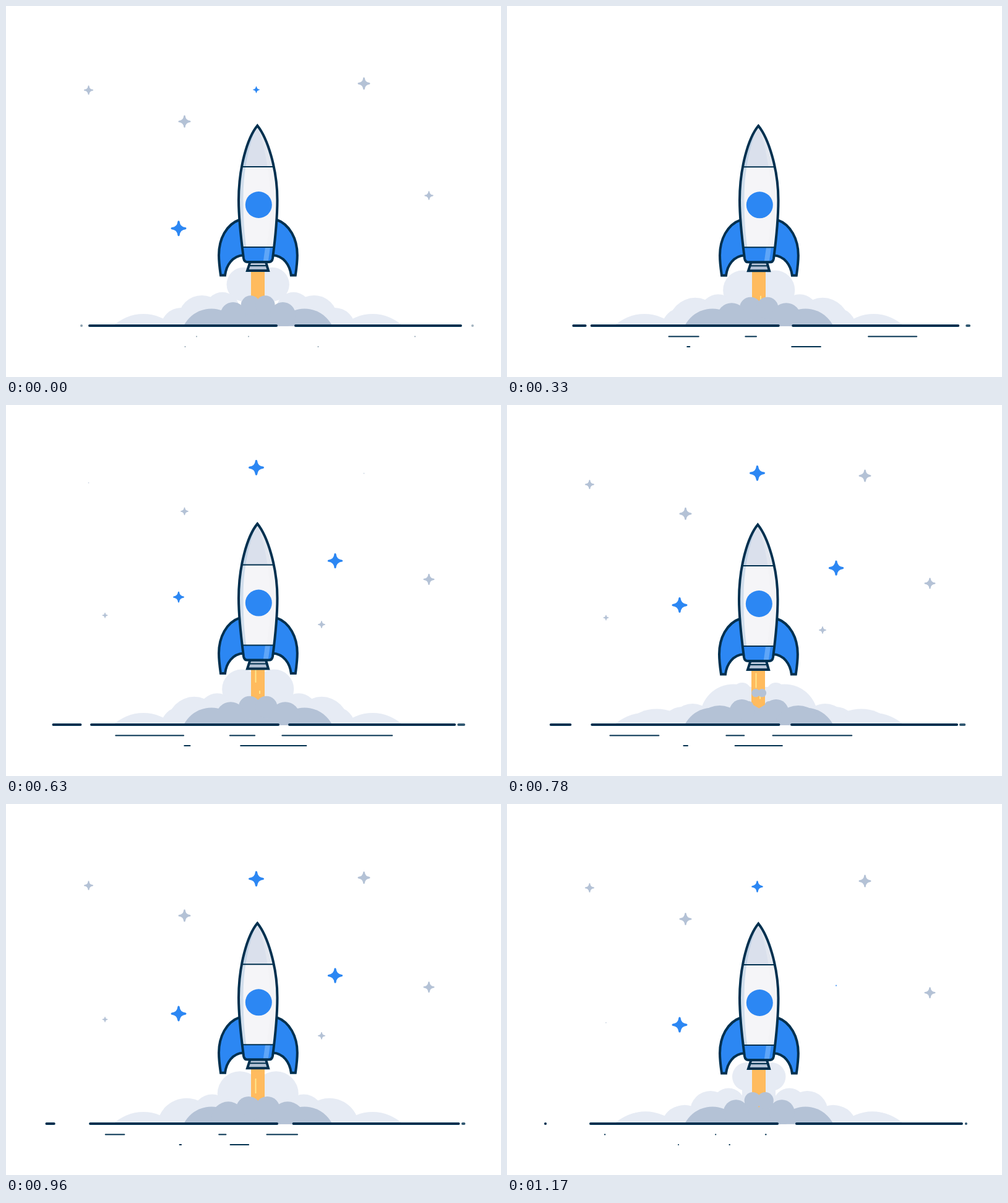
These frames come from a looping animation (800x600 px, 1200 ms). An HTML page:

```html
<!DOCTYPE html>
<html lang="en">
<head>
<meta charset="utf-8">
<title>Rocket launch</title>
<style>
html, body { margin: 0; width: 100%; height: 100%; overflow: hidden; background: #fff; }
svg { display: block; width: 100%; height: 100%; }
.o { stroke: #00304f; stroke-width: 4; stroke-linecap: round; }
.thin { stroke-width: 2; }
</style>
</head>
<body>
<svg viewBox="0 0 800 600">
  <defs>
    <clipPath id="sky"><rect width="800" height="517.5"/></clipPath>
    <path id="hull" d="M406.3 193.5C390 213 376 262 376 314C376 348 381 385 384 408Q385 414 390 414H425Q430 414 431 408C434 385 438.5 348 438.5 314C438.5 262 422 213 406.3 193.5Z"/>
    <clipPath id="inside"><use href="#hull"/></clipPath>
    <path id="fin" class="o" fill="#2c87f3" d="M378 345.5C356 353 344 377 344 403C344 415 345.5 425 347 435.5H354C356 419 366 404 384 403Z"/>
    <path id="star" d="M0-10.8Q1-1 10.8 0Q1 1 0 10.8Q-1 1-10.8 0Q-1-1 0-10.8Z" stroke-width="3.2" stroke-linejoin="round"/>
  </defs>
  <g id="stars"></g>
  <g id="light" clip-path="url(#sky)" fill="#e6ebf4">
    <path d="M380 456H434V503H531V518H283V503H380Z"/>
  </g>
  <g id="flame"><rect x="396" y="424" width="22" height="72" fill="#ffbb5e"/></g>
  <g id="dark" clip-path="url(#sky)" fill="#b4c2d6">
    <path d="M340 518V494H388L397 484.5L407.3 490.5L417.5 484.5L426 494H474V518Z"/>
  </g>
  <g id="rocket">
    <use href="#fin"/>
    <use href="#fin" transform="translate(814.8) scale(-1 1)"/>
    <path class="o" fill="#b4c2d6" d="M394.5 414H420L424 428H390Z"/>
    <path class="o thin" d="M393 420H421.5"/>
    <g clip-path="url(#inside)">
      <rect x="370" y="190" width="74" height="70" fill="#dae0ec"/>
      <rect x="370" y="260" width="74" height="130" fill="#f5f5f8"/>
      <path fill="#96b9d7" fill-opacity=".38" d="M406 193C394 220 383.5 262 383.5 310C383.5 345 386 375 388.5 390H370V193Z"/>
      <path fill="#f0f0f3" fill-opacity=".4" d="M406 193C418 225 427 270 427 320C427 350 424 372 421 390H444V193Z"/>
      <rect x="370" y="390" width="74" height="26" fill="#2c87f3"/>
      <path fill="#5fa6f8" d="M419 390H427L423.5 415H415.5Z"/>
      <path class="o thin" d="M370 260H444M370 390H444"/>
    </g>
    <use href="#hull" class="o" fill="none"/>
    <circle cx="408.3" cy="321.5" r="21.5" fill="#2c87f3"/>
  </g>
  <g id="ground"></g>
</svg>
<script>
const LOOP = 1200, PUFF = 300, MID = 407.2;
const GREY = '#b4c2d6', BLUE = '#2c87f3';

const $ = id => document.getElementById(id);
function set(el, attrs) {
  for (const k in attrs) el.setAttribute(k, attrs[k]);
}
function add(parent, tag, attrs = {}) {
  const el = document.createElementNS('http://www.w3.org/2000/svg', tag);
  set(el, attrs);
  parent.appendChild(el);
  return el;
}
const clamp = v => Math.max(0, Math.min(1, v));

// Straight moves between key points [time, ...values]; null outside them
function along(path, t) {
  const i = path.findIndex((p, j) => j && t >= path[j - 1][0] && t < p[0]);
  if (i < 0) return null;
  const a = path[i - 1], b = path[i], k = (t - a[0]) / (b[0] - a[0]);
  return a.slice(1).map((v, j) => v + (b[j + 1] - v) * k);
}

// Stars pop in, sink for LIFE ms and shrink away
const LIFE = 800, POP = 94;
const star = (x, y, speed, r, color, birth) => ({
  x, y, speed, r, birth,
  el: add($('stars'), 'use', { href: '#star', fill: color, stroke: color })
});
const stars = [
  star(133.5, 125.6, .018, 7.5, GREY, 618),
  star(578.5, 110.3, .026, 10, GREY, 620),
  star(288.5, 170.4, .026, 10, GREY, 570),
  star(683.5, 275.3, .043, 9, GREY, 475),
  star(279, 304.9, .086, 12.5, BLUE, 563),
  star(404.5, 89.8, .06, 12.5, BLUE, 440),
  star(532, 232.8, .077, 12.2, BLUE, 380),
  star(510, 339.1, .06, 6, GREY, 365),
  star(160, 334.2, .025, 4.5, GREY, 390)
];

function drawStars(t) {
  for (const { x, y, speed, r, birth, el } of stars) {
    const age = (t - birth + LOOP) % LOOP;
    const size = clamp(age / POP) * clamp((LIFE - age) / POP) * r / 12.4;
    set(el, { transform: `translate(${x} ${y + age * speed}) scale(${size})` });
  }
}

// Each puff is mirrored about MID: x, top, radius
const pair = group => [0, 1].map(() => add($(group), 'circle'));
function place(els, [x, top, r]) {
  els.forEach((el, i) => set(el, { cx: i ? 2 * MID - x : x, cy: top + r, r }));
}
place(pair('light'), [222, 498, 71]);
place(pair('light'), [283, 488, 33]);
place(pair('dark'), [332, 489.5, 50]);
place(pair('dark'), [391, 479, 7]);

// A new puff leaves on every path each PUFF ms
const puffs = [
  ['light', [[200, 395, 440, 0], [270, 387, 418, 23], [480, 366, 451.5, 54],
    [570, 329, 464, 33], [780, 242, 491.5, 68], [880, 222, 498, 71]]],
  ['light', [[420, 388, 455, 0], [480, 380, 449, 15], [570, 358, 459.5, 26],
    [780, 300, 483, 38], [900, 283, 488, 33]]],
  ['dark', [[130, 402, 458, 0], [180, 402, 459, 6.8], [360, 392, 473, 20],
    [600, 367, 479, 20.5], [870, 332, 489.5, 50]]]
].flatMap(([group, path]) => [0, 1, 2].map(n => ({ n, path, els: pair(group) })));

function drawPuffs(t) {
  for (const { n, path, els } of puffs) {
    place(els, along(path, t % PUFF + n * PUFF) || [0, 0, 0]);
  }
}

// Bright streaks slide down the flame
const streak = (x, from, to, y, len) => ({
  x, from, to, y, len,
  el: add($('flame'), 'line', { x1: x, x2: x, stroke: '#ffea90', 'stroke-width': 1.8 })
});
const streaks = [
  streak(403.5, 400, 1090, 435.5, 24),
  streak(410, 100, 240, 450, 3),
  streak(410, 100, 240, 471, 3),
  streak(410, 300, 560, 477, 10),
  streak(410, 580, 1000, 464, 5)
];
const shake = [[0, 0, 0], [180, 1, 1], [480, -1, -.4], [630, 0, -1.4],
  [780, -1, 0], [960, 0, -.7], [1170, 0, 0], [LOOP, 0, 0]];

function drawRocket(t) {
  const [x, y] = along(shake, t);
  set($('rocket'), { transform: `translate(${x} ${y})` });
  set($('flame'), { transform: `translate(${x} 0)` });
  for (const s of streaks) {
    const tip = s.y + (t - s.from) * .058;
    const on = t >= s.from && t < s.to;
    set(s.el, { y1: tip - s.len, y2: tip, visibility: on ? 'visible' : 'hidden' });
  }
}

// Ground dashes: the left end runs ahead, the right end follows, both sway
const dash = (y, width, x1, x2, run, sway, alpha = 1) => ({
  width, x1, x2, run, sway, alpha,
  el: add($('ground'), 'line', { class: 'o', y1: y, y2: y, style: `stroke-width:${width}` })
});
const speck = (y, x, run, sway) => dash(y, 2, x - 1, x + 1, run, sway);
const dashes = [
  dash(517, 4, 133, 439, 0, 3),
  dash(517, 4, 466, 737, 0, -10),
  dash(517, 4, 752, 756, 12, -12, .8),
  dash(517, 4, 120, 124, 60, 8),
  speck(534.5, 308, 150, 3),
  speck(534.5, 392, 55, 19),
  speck(534.5, 661, 243, 2),
  speck(551, 289.5, 12.5, 10),
  speck(551, 504.5, 145, 4)
];
const lead = t => 1.01 - 1.01 / (1 + (t / 394) ** 4.3);
const follow = t => (1 - Math.cos(Math.PI * clamp((t - 430) / 765))) / 2;

function drawGround(t) {
  const swing = Math.sin(Math.PI * t / LOOP) ** 2;
  for (const { el, width, x1, x2, run, sway, alpha } of dashes) {
    const a = x1 + sway * swing - run * lead(t) + width / 2;
    const b = x2 + sway * swing - run * follow(t) - width / 2;
    const fade = run ? .45 + .55 * clamp(t / 90) : 1;
    set(el, { x1: a, x2: Math.max(a + .01, b), opacity: alpha * fade });
  }
}

function draw(t) {
  drawStars(t);
  drawPuffs(t);
  drawRocket(t);
  drawGround(t);
}

let start;
function tick(now) {
  start ??= now;
  draw(Math.max(0, now - start) % LOOP);
  requestAnimationFrame(tick);
}
draw(0);
requestAnimationFrame(tick);
</script>
</body>
</html>
```
